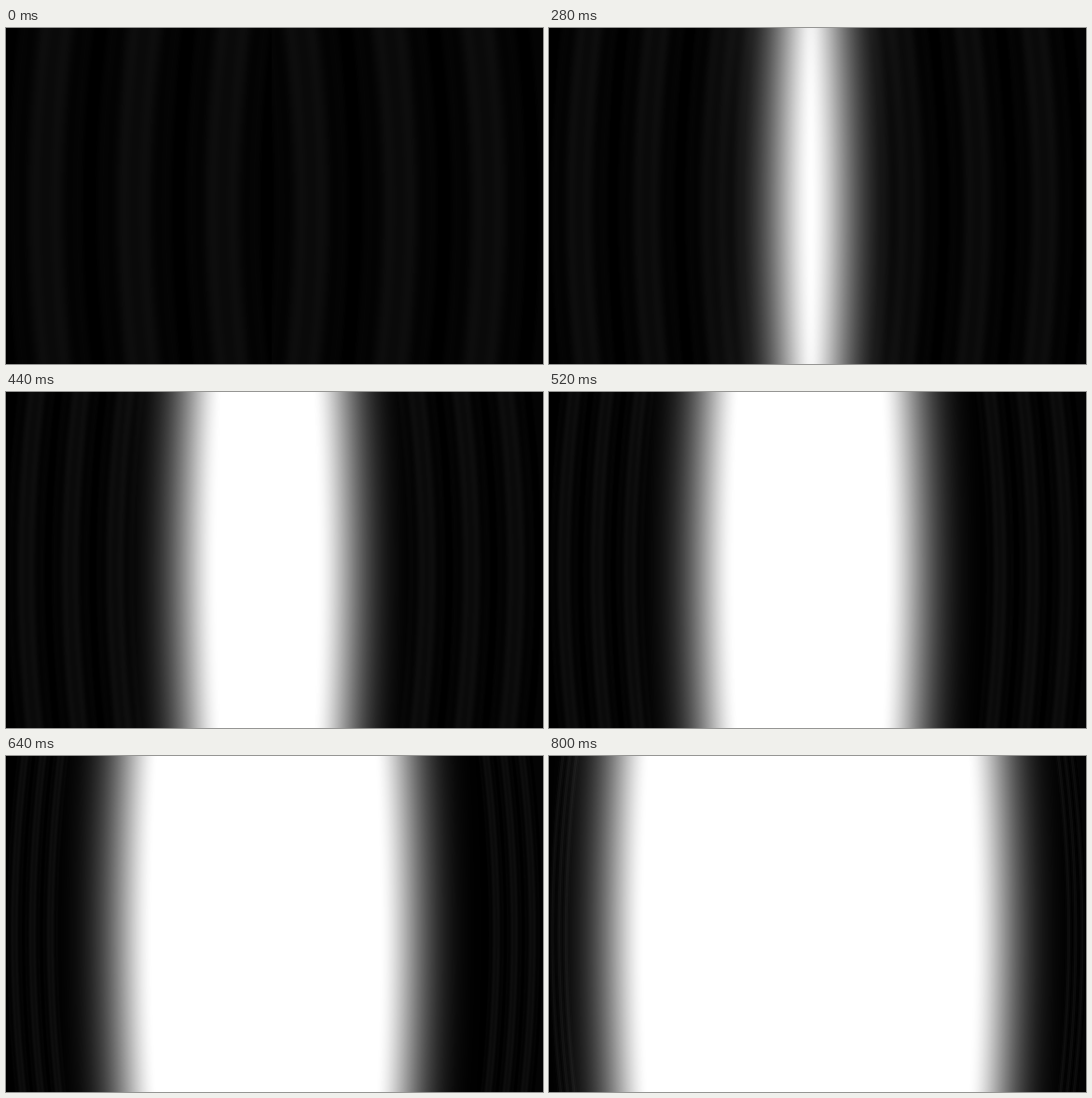
Write an HTML page with a canvas that moves like this. It is 576 px wide and 360 px high and loops after 0.84 s.

```html
<!DOCTYPE html>
<html lang="en">
<head>
<meta charset="utf-8">
<title>Curtain opening</title>
<style>
  html, body { margin: 0; width: 100%; height: 100%; overflow: hidden; background: #000; }
  canvas { display: block; }
</style>
</head>
<body>
<canvas id="stage" width="576" height="360"></canvas>
<script>
const W = 576, H = 360, MID = 285, LOOP = 840, STEP = 40;
const RAMP = 124;       // width of the soft edge of the light
const HALF_LIT = 0.7;   // where along the ramp the light reaches one half
const FOLD = 95;        // distance between cloth folds

const ctx = document.getElementById('stage').getContext('2d');
const image = ctx.createImageData(W, H);
const pixels = new Uint32Array(image.data.buffer);

const clamp = (v, low, high) => Math.min(high, Math.max(low, v));
const smooth = u => u * u * (3 - 2 * u);

// Wide folds, each crest split into two thin ridges
function clothGrey(x) {
  const angle = (x - 42) / FOLD * 2 * Math.PI;
  return Math.max(0, 6 + 6 * Math.cos(angle) - 2.5 * Math.cos(4 * angle));
}

// Light at a distance inside (positive) or outside the edge of the gap
function glow(distance) {
  const u = clamp(HALF_LIT + distance / RAMP, 0, 1);
  return smooth(Math.pow(u, 1.8));
}

function draw(time) {
  const left = 286 - 0.345 * (time - 160);
  const right = 276 + 0.335 * (time - 160);
  const squeeze = 1 - 0.93 * smooth(time / LOOP);

  for (let y = 0; y < H; y++) {
    const bend = ((y - 190) / 180) ** 2;
    const clothBow = 10 * bend, lightBow = 5 * bend;
    for (let x = 0; x < W; x++) {
      const spot = x < MID
        ? clamp((x - clothBow) / squeeze, 0, MID)
        : clamp(W - (W - x - clothBow) / squeeze, MID, W);
      const cloth = clothGrey(spot);
      const light = glow(x - left - lightBow) * glow(right - x - lightBow);
      const grey = Math.round(cloth + (255 - cloth) * light);
      pixels[y * W + x] = 0xff000000 | grey * 0x010101;
    }
  }
  ctx.putImageData(image, 0, 0);
}

let shown = -1;
function tick() {
  const time = Math.floor(performance.now() % LOOP / STEP) * STEP;
  if (time !== shown) draw(shown = time);
  requestAnimationFrame(tick);
}
tick();
</script>
</body>
</html>
```
